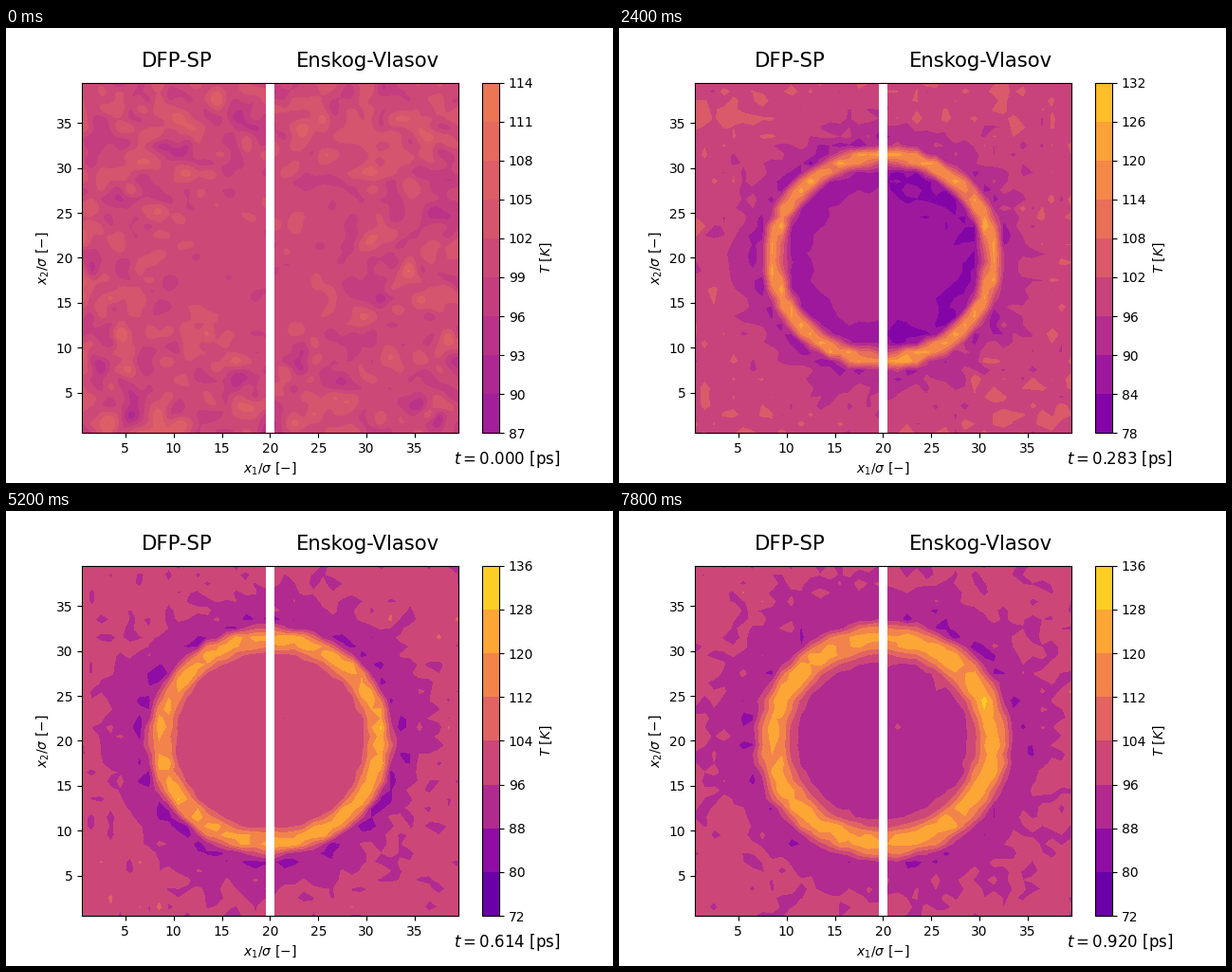
Recreate the animation shown at these times as a matplotlib script. Size 640x480 px, loop 8000 ms.

```python
import matplotlib.pyplot as plt
import numpy as np
from matplotlib.animation import FuncAnimation
from matplotlib.ticker import MaxNLocator

FRAMES = 40
STEP_MS = 200
DT = 0.0236  # ps per frame
T0 = 100.5   # initial mean temperature
CELLS = np.arange(0.5, 40)


def grow(k, tau):
    return 1 - np.exp(-k / tau)


def pulse(k, mid, width):
    return np.exp(-((k - mid) / width) ** 2)


def inside(r, k, right):
    """Bulk of the drop: a slow oscillation plus an early cold rim."""
    wave = -5 + 3.5 * np.cos(2 * np.pi * (k - 26) / 19)
    chill = 8 * pulse(k, 11, 6) if right else 0
    rim = (9 if right else 14) * pulse(k, 8, 5)
    return T0 + grow(k, 3.5) * (wave - chill - rim * np.minimum(r / 9, 1) ** 1.5)


def outside(r, k, right):
    """Vapour: a cold shell around the drop that spreads outwards."""
    deficit = 15.5 * (1 - pulse(k, 0, 11 if right else 9))
    reach = 1.6 + 1.8 * k / FRAMES
    far = T0 - 0.2 - 1.2 * k / FRAMES
    return far - deficit * np.exp(-np.maximum(r - 13, 0) / reach)


def temperature(r, k, right):
    center = 11.35 + 0.1 * k / FRAMES
    width = 0.85 + 0.9 * (k / FRAMES) ** 2
    peak = T0 + (23 if right else 22) * grow(k, 4.5)
    base = np.where(r < center, inside(r, k, right), outside(r, k, right))
    return base + (peak - base) * np.exp(-np.abs((r - center) / width) ** 3)


def white(seed):
    return np.random.default_rng(seed).standard_normal((40, 40))


def noise(k):
    return (white(k + 100) + white(k + 101)) / np.sqrt(2)


def smooth(z, x, y):
    """Gaussian resampling on a finer grid."""
    def refine(c):
        fine = np.linspace(c[0], c[-1], 5 * len(c))
        w = np.exp(-0.5 * ((fine[:, None] - c) / 0.6) ** 2)
        return fine, w / w.sum(1, keepdims=True)
    (fx, wx), (fy, wy) = refine(x), refine(y)
    return fx, fy, wy @ z @ wx.T


def half(k, right):
    cols = slice(20, 40) if right else slice(0, 20)
    x, y = CELLS[cols], CELLS
    r = np.hypot(x[None, :] - 20, y[:, None] - 20)
    n = noise(k)[:, cols]
    if k == 0:
        return smooth(T0 + n * np.interp(r, [7, 12], [1.6, 4.7]), x, y)
    sigma = np.interp(r, [9, 11], [1, 2.7] if right else [0.6, 2.4])
    return x, y, temperature(r, k, right) + n * sigma


def contour_levels(k):
    low = 89.5 - 11.5 * grow(k, 8)
    high = 112 + 17.1 * grow(k, 7)
    return MaxNLocator(8, min_n_ticks=1).tick_values(low, high)


fig = plt.figure(figsize=(6.4, 4.8), dpi=100)


def draw(k):
    fig.clear()
    ax = fig.add_subplot()
    levels = contour_levels(k)
    for right in (False, True):
        x, y, z = half(k, right)
        z = np.clip(z, levels[0] + 0.1, levels[-1] - 0.1)
        cs = ax.contourf(x, y, z, levels=levels,
                         cmap="plasma", vmin=60, vmax=140)
    ax.set(xlim=(0.5, 39.5), ylim=(0.5, 39.5),
           xticks=range(5, 40, 5), yticks=range(5, 40, 5),
           xlabel=r"$x_1/\sigma$ $[-]$", ylabel=r"$x_2/\sigma$ $[-]$")
    fig.colorbar(cs, ax=ax, ticks=levels, label="$T$ $[K]$")
    ax.text(6.72, 41.2, "DFP-SP", fontsize=15.2)
    ax.text(22.72, 41.2, "Enskog-Vlasov", fontsize=15.2)
    ax.text(39, -3, f"$t={k * DT:.3f}$ [ps]", fontsize=12)


anim = FuncAnimation(fig, draw, frames=FRAMES, interval=STEP_MS,
                     repeat=True, repeat_delay=0)
plt.show()
```
